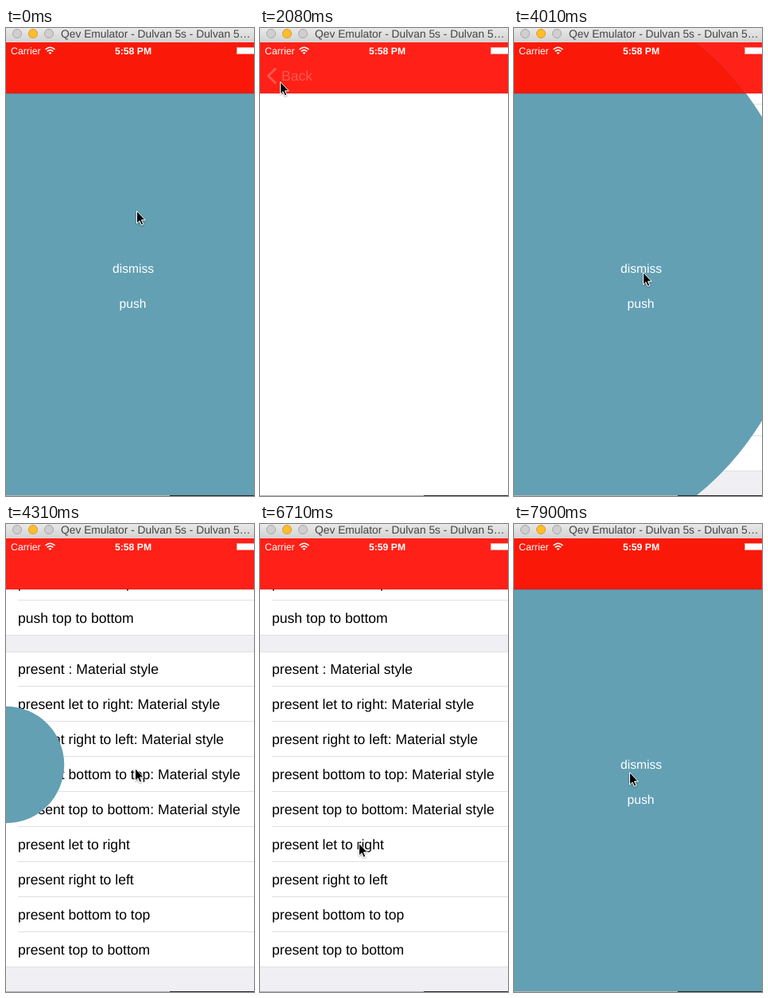
An HTML page that plays this animation: 312 px wide and 587 px high, repeating every 8000 ms.

```html
<!DOCTYPE html>
<html lang="en">
<head>
<meta charset="utf-8">
<title>View transitions</title>
<style>
  html, body { margin: 0; width: 100%; height: 100%; overflow: hidden; background: #fff; }
  svg { display: block; width: 312px; height: 587px; }
  text { font-family: "Liberation Sans", Arial, sans-serif; white-space: pre; text-rendering: geometricPrecision; }
  .row { font-size: 17.6px; fill: #000; }
  .button { font-size: 15.6px; fill: #fff; text-anchor: middle; }
  .status { font-size: 12.3px; fill: #fff; }
  .clock { font-size: 12.2px; font-weight: bold; text-anchor: middle; }
  .title { font-size: 13.8px; fill: #444; }
  .line { stroke: #e0e0e2; stroke-width: 1; }
</style>
</head>
<body>
<svg viewBox="0 0 312 587">
  <defs>
    <linearGradient id="chrome" x2="0" y2="1">
      <stop offset="0" stop-color="#e9e9e9"/>
      <stop offset="1" stop-color="#d2d2d2"/>
    </linearGradient>
    <clipPath id="reveal"><circle id="hole" r="600"/></clipPath>
    <filter id="soft" x="-50%" y="-50%" width="200%" height="200%">
      <feDropShadow dx="0" dy="1" stdDeviation="1" flood-opacity=".4"/>
    </filter>
  </defs>

  <g id="list">
    <rect width="312" height="587" fill="#fff"/>
    <rect y="139" width="312" height="22" fill="#efeff4"/>
    <rect y="555" width="312" height="32" fill="#efeff4"/>
    <g id="rows"></g>
    <rect y="18" width="312" height="64" fill="#ff2017"/>
  </g>

  <g id="modal" clip-path="url(#reveal)">
    <rect y="18" width="312" height="569" fill="#63a0b4"/>
    <g id="page">
      <text id="dismiss" class="button" x="160" y="307">dismiss</text>
      <text id="push" class="button" x="159.5" y="351">push</text>
    </g>
    <rect id="dim" y="82" width="312" height="505"/>
    <rect id="blank" y="82" width="320" height="505" fill="#fff"/>
    <rect y="18" width="312" height="64" fill="#fa1908"/>
    <rect id="bar" y="18" width="312" height="64" fill="#ff2017"/>
    <path id="chevron" d="M20 50.5 10.5 60 20 69.5" fill="none" stroke="#fff" stroke-width="3"/>
    <text id="back" class="row" y="66" style="fill:#fff">Back</text>
  </g>

  <g>
    <rect y="82" width="312" height=".5" opacity=".25"/>
    <text class="status" x="6" y="33">Carrier</text>
    <g fill="none" stroke="#fff" stroke-width="1.6">
      <path d="M49.5 27Q55.5 21.500 61.5 27"/>
      <path d="M51.700 29.300Q55.5 25.800 59.300 29.300"/>
    </g>
    <path d="M53.5 31Q55.5 29.300 57.5 31L55.5 33Z" fill="#fff"/>
    <text id="clock" class="status clock" x="160" y="32.500"></text>
    <rect x="290.5" y="24.5" width="25" height="8" fill="none" stroke="#fff" stroke-opacity=".6"/>
    <rect x="291" y="25" width="22" height="7" fill="#fff"/>
  </g>

  <g>
    <rect width="312" height="18" fill="url(#chrome)"/>
    <g stroke-width="1">
      <circle cx="14" cy="7" r="5.5" fill="#cfcfcf" stroke="#a8a8a8"/>
      <circle cx="34" cy="7" r="5.5" fill="#fdbd2d" stroke="#dc9c22"/>
      <circle cx="54" cy="7" r="5.5" fill="#cfcfcf" stroke="#a8a8a8"/>
    </g>
    <text class="title" x="69" y="12">Qev Emulator - Dulvan 5s - Dulvan 5…</text>
    <rect y="586" width="206" height="1" fill="#b4b4b4"/>
    <rect x="206" y="586" width="106" height="1" fill="#2a2a2a"/>
  </g>

  <path id="cursor" filter="url(#soft)" d="M-.5 .5V16L3 12.800 5.300 18 7.800 17 5.5 11.800H10.200Z"
    fill="#000" stroke="#fff" stroke-width="1"/>
</svg>
<script>
const LOOP = 8000, STEP = 149, LEAD = 12;
const $ = id => document.getElementById(id);
const clamp = v => Math.min(1, Math.max(0, v));
const smooth = v => { v = clamp(v); return v * v * (3 - 2 * v); };

// Table rows
const svgNS = 'http://www.w3.org/2000/svg';
function add(tag, attrs, text = '') {
  const el = document.createElementNS(svgNS, tag);
  for (const key in attrs) el.setAttribute(key, attrs[key]);
  el.textContent = text;
  $('rows').append(el);
}
const rule = (x, y) => add('line', { class: 'line', x1: x, x2: 312, y1: y, y2: y });
const row = (text, y) => add('text', { class: 'row', x: 15, y }, text);

const ways = ['let to right', 'right to left', 'bottom to top', 'top to bottom'];
const names = ['present : Material style',
  ...ways.map(w => `present ${w}: Material style`),
  ...ways.map(w => `present ${w}`)];
row('push bottom to top', 80);
row('push top to bottom', 124);
rule(15, 95.5);
rule(0, 139.5);
rule(0, 160.5);
names.forEach((name, i) => {
  row(name, 188 + 44 * i);
  rule(i < names.length - 1 ? 15 : 0, 203.5 + 44 * i);
});

// Pointer stops: step, x, y
const stops = [
  [0, 165, 229], [1, 165, 245], [2, 167, 295], [3, 167, 342], [4, 167, 351],
  [8, 167, 351], [10, 125, 245], [12, 38, 78], [13, 26, 67],
  [16, 26, 67], [18, 30, 80], [20, 140, 280], [21, 161, 326], [23, 163, 306],
  [30, 163, 306], [32, 232, 358], [33, 234, 378], [35, 190, 412],
  [38, 92, 398], [39, 123, 400], [40, 125, 400],
  [46, 125, 400], [47, 130, 380], [48, 143, 335], [49, 146, 311], [54, 146, 311]
];
function pointer(k) {
  const i = stops.findIndex(s => s[0] > k);
  const [a, x, y] = stops[i - 1], [b, u, v] = stops[i];
  const p = (k - a) / (b - a);
  return [x + (u - x) * p, y + (v - y) * p];
}

// Critically damped slide: share of the way left to go
const spring = t => t <= 0 ? 1 : (1 + t) * Math.exp(-t);

function pushed(k) {
  if (k < 6 || k >= 18) return 0;
  if (k < 15) return k > 8 ? 1 : 1 - spring(2.75 * (k - 5));
  return spring(2.1 * (k - 14.3));
}

function circle(k) {
  if (k < 26) return [0, 302, 600];
  if (k < 52) return [0, 302, 428 * (1 - smooth((k - 26.03) / 4.03))];
  return [160, 586, k < 53 ? 330 : 600];
}

const fade = (id, v) => $(id).setAttribute('opacity', v);

function draw(k) {
  const p = pushed(k), left = 1 - p;
  const [x, y] = pointer(k);
  const [cx, cy, r] = circle(k);
  const pressed = k >= 14 && k < 18;

  $('cursor').setAttribute('transform', `translate(${x} ${y})`);
  $('hole').setAttribute('cx', cx);
  $('hole').setAttribute('cy', cy);
  $('hole').setAttribute('r', r);
  $('modal').style.display = r > 0 ? '' : 'none';

  $('page').setAttribute('transform', `translate(${-96 * p} 0)`);
  $('blank').setAttribute('x', 320 * left);
  $('back').setAttribute('x', 27 + 45 * left);
  fade('dim', 0.1 * p);
  fade('bar', p);
  fade('back', pressed ? 0.25 * p : clamp(1 - 2.2 * left));
  fade('chevron', pressed ? 0.25 * p : p && clamp(0.7 - 5 * left + (k > 7 ? 0.3 : 0)));
  fade('push', k === 4 || k === 5 ? 0.25 : 1);
  fade('dismiss', k === 25 ? 0.25 : k === 26 ? 0.6 : 1);
  $('clock').textContent = k < 45 ? '5:58 PM' : '5:59 PM';
}

let shown = -1;
function tick() {
  const k = Math.floor((performance.now() % LOOP + LEAD) / STEP);
  if (k !== shown) draw(shown = k);
  requestAnimationFrame(tick);
}
tick();
</script>
</body>
</html>
```
